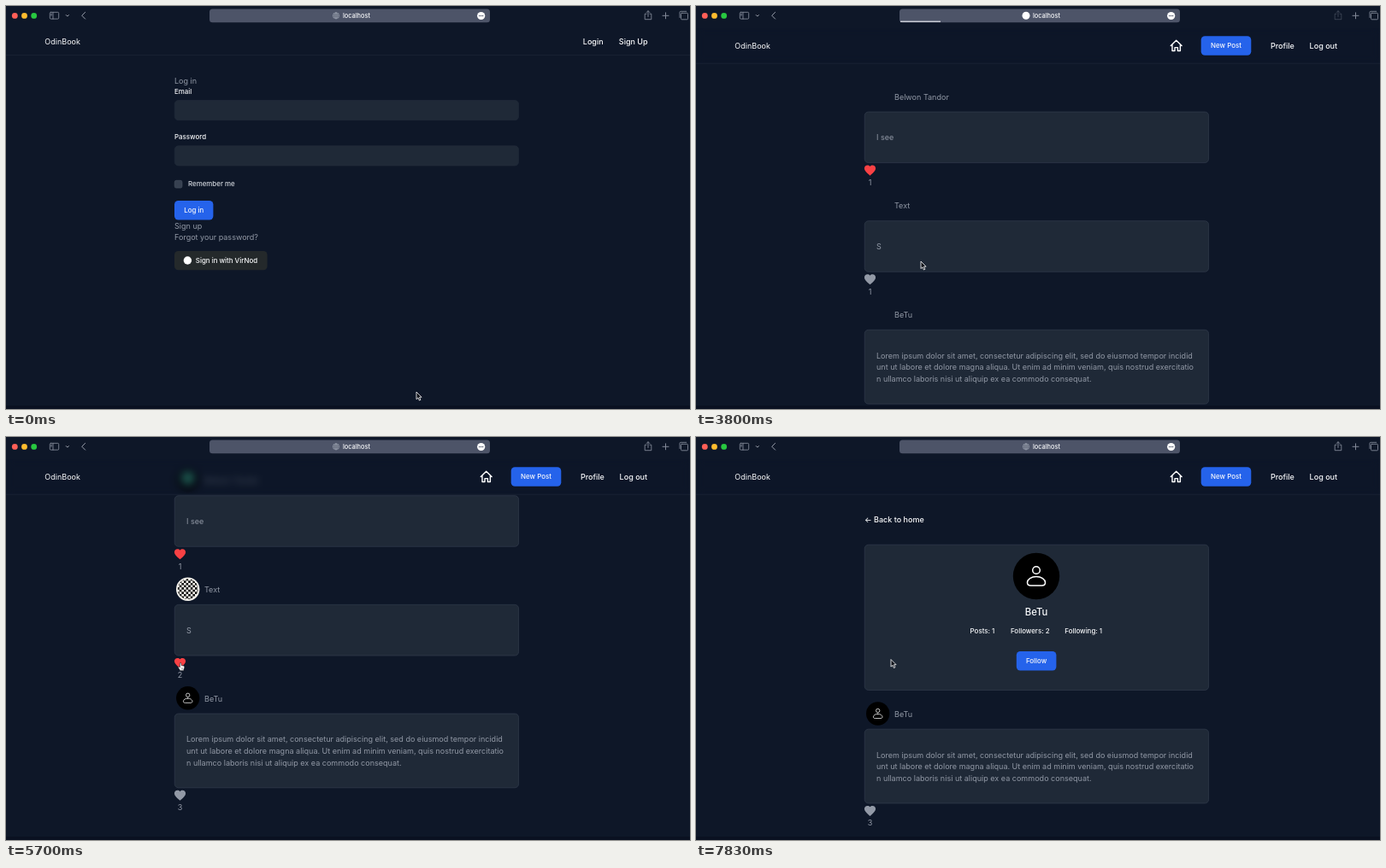
An HTML page for the animation above (8000 ms loop, 800x472 px).

```html
<!DOCTYPE html>
<html lang="en">
<head>
<meta charset="utf-8">
<title>OdinBook</title>
<style>
  html, body { margin: 0; width: 100%; height: 100%; overflow: hidden; background: #0e1728; }
  svg { position: absolute; left: 0; top: 0; width: 800px; height: 472px; }
  svg text { font-family: Inter, sans-serif; white-space: pre; }
  #glass {
    position: absolute; left: 0; top: 26px; width: 800px; height: 41px;
    background: rgba(14, 23, 40, .55);
    -webkit-backdrop-filter: blur(4px); backdrop-filter: blur(4px);
  }
</style>
</head>
<body>
<svg id="page" viewBox="0 0 800 472"></svg>
<div id="glass"></div>
<svg id="overlay" viewBox="0 0 800 472"></svg>
<script>
const LOOP = 8000;
const BG = '#0e1728', CARD = '#1f2937', LINE = '#374151', GRAY = '#9299a6', WHITE = '#f8f9fb',
      BLUE = '#2563eb', RED = '#f94144';
const BASE = 9.04, SMALL = 7.91;
const AUTHOR = 'Belwon Tandor', MEMBER = 'BeTu';
const LOREM = [
  'Lorem ipsum dolor sit amet, consectetur adipiscing elit, sed do eiusmod tempor incidid',
  'unt ut labore et dolore magna aliqua. Ut enim ad minim veniam, quis nostrud exercitatio',
  'n ullamco laboris nisi ut aliquip ex ea commodo consequat.'
];

// SVG builders; text is placed by the vertical centre of its capitals
const text = (x, y, str, { size = BASE, weight = 400, fill = GRAY, anchor = 'start', id = '' } = {}) =>
  `<text id="${id}" x="${x}" y="${y + size * .364}" font-size="${size}" font-weight="${weight}" fill="${fill}" text-anchor="${anchor}">${str}</text>`;
const rect = (x, y, w, h, fill, { r = 4.5, stroke = 'none', id = '' } = {}) =>
  `<rect id="${id}" x="${x}" y="${y}" width="${w}" height="${h}" rx="${r}" fill="${fill}" stroke="${stroke}" stroke-width=".6"/>`;
const circle = (x, y, r, fill, extra = '') => `<circle cx="${x}" cy="${y}" r="${r}" fill="${fill}" ${extra}/>`;
const line = (d, stroke, width = .9, extra = '') =>
  `<path d="${d}" fill="none" stroke="${stroke}" stroke-width="${width}" stroke-linecap="round" stroke-linejoin="round" ${extra}/>`;
const group = (id, content, extra = '') => `<g id="${id}" ${extra}>${content}</g>`;
const panel = (y, h) => rect(197.2, y, 402.4, h, CARD, { stroke: LINE });
const button = (x, y, w, label) =>
  rect(x, y, w, 22.5, BLUE) +
  text(x + w / 2, y + 11.3, label, { size: SMALL, weight: 500, fill: WHITE, anchor: 'middle' });

const heart = (y, fill, id = '') =>
  `<path id="${id}" transform="translate(195.6 ${y - 8}) scale(.66)" fill="${fill}" d="M12 21.3l-1.4-1.3C5.4 15.4 2 12.3 2 8.5 2 5.4 4.4 3 7.5 3c1.7 0 3.4.8 4.5 2.1C13.1 3.8 14.8 3 16.5 3 19.6 3 22 5.4 22 8.5c0 3.8-3.4 6.9-8.6 11.5z"/>`;

const avatars = {
  person: (x, y, scale) => `<g transform="translate(${x} ${y}) scale(${scale})">` + circle(0, 0, 27.2, '#000') +
    circle(0, -7, 4.3, 'none', 'stroke="#fff" stroke-width="1.5"') +
    line('M0 .5c6 0 10.5 3.5 10.5 7 0 2.300-1.500 3.500-4 3.500h-13c-2.500 0-4-1.200-4-3.500 0-3.500 4.500-7 10.500-7z', '#fff', 1.5) + '</g>',
  checks: (x, y) => circle(x, y, 13.7, '#f4f2ec') + circle(x, y, 11.9, 'url(#checks)'),
  glow: (x, y) => circle(x, y, 13.7, '#000') +
    `<ellipse cx="${x}" cy="${y - 2.500}" rx="8" ry="8" fill="#2b9470"/>`
};

function post(y, height, name, avatar, body, likes, liked, id) {
  const end = y + height;
  return group('', avatars[avatar](212.7, y - 18.2, .503), `class="avatar-${id}"`) +
    text(232, y - 17.7, name) + panel(y, height) +
    body.map((row, i) => text(211, y + 30.2 + i * 13.56, row)).join('') +
    heart(end + 9, liked ? RED : GRAY, 'heart-' + id) +
    text(203.5, end + 23, likes, { anchor: 'middle', id: 'likes-' + id });
}

const field = (y, label) =>
  text(197, y, label, { size: SMALL, weight: 500, fill: WHITE }) + rect(197.2, y + 10.500, 402.4, 23.2, CARD, { stroke: '#222d3b' });

const login =
  text(197, 88, 'Log in') + field(100, 'Email') + field(153.3, 'Password') +
  rect(197.2, 204.3, 8.8, 8.8, LINE, { r: 2, stroke: '#4b5563' }) +
  text(213, 208.4, 'Remember me', { size: SMALL, weight: 500, fill: '#d3d7de' }) +
  button(197, 228, 45.4, 'Log in') +
  text(197, 257.6, 'Sign up') + text(197, 271.2, 'Forgot your password?') +
  rect(197, 287, 108.600, 22.2, '#24292b', { id: 'oauth' }) +
  circle(212.4, 298, 4.7, '#fff') +
  text(221.8, 298, 'Sign in with VirNod', { size: SMALL, weight: 500, fill: WHITE });

const feed =
  post(124, 59.600, AUTHOR, 'glow', ['I see'], 1, true, 'a') +
  post(251.7, 59.600, 'Text', 'checks', ['S'], 1, false, 'b') +
  post(379.3, 86.800, MEMBER, 'person', LOREM, 3, false, 'c') +
  rect(5, 564, 786, 60, '#1a2434');

const stat = (x, label) => text(x, 227.3, label, { size: SMALL, weight: 500, fill: WHITE });
const profile =
  text(197, 97, '← Back to home', { weight: 500, fill: WHITE }) + panel(126.2, 170.3) +
  avatars.person(398, 163, 1) +
  text(398, 204.600, MEMBER, { size: 11.3, weight: 500, fill: WHITE, anchor: 'middle' }) +
  stat(320.6, 'Posts: 1') + stat(368, 'Followers: 2') + stat(431.3, 'Following: 1') +
  button(374.8, 251, 46.6, 'Follow') +
  post(342.2, 86.800, MEMBER, 'person', LOREM, 3, false, 'd');

const navText = (x, y, str) => text(x, y, str, { weight: 500, fill: WHITE });
const brand = y => text(45.3, y, 'OdinBook', { fill: WHITE });
const border = y => `<rect y="${y}" width="800" height=".7" fill="#1c2637"/>`;
const guestNav = brand(42) + navText(674.8, 42, 'Login') + navText(716.8, 42, 'Sign Up') + border(57.3);
const memberNav = brand(46.500) +
  line('M555.300 46.600l6.400-6.300 6.400 6.300M557 45.200v7.300h3v-3.900h3.400v3.900h3v-7.300', '#fff', 1.4) +
  button(590.7, 35.2, 58.6, 'New Post') +
  navText(671.9, 46.500, 'Profile') + navText(717.6, 46.500, 'Log out') + border(66.800);

const ICON = '#828998';
const chrome =
  `<rect width="800" height="26" fill="${BG}"/>` +
  circle(10.3, 11.4, 3.4, '#ff5f57') + circle(21.5, 11.4, 3.4, '#febc2e') + circle(32.7, 11.4, 3.4, '#28c840') +
  line('M52.500 7.300h8q1.200 0 1.200 1.200v5.400q0 1.200-1.200 1.200h-8q-1.200 0-1.200-1.200v-5.400q0-1.200 1.200-1.200zM55 7.300v7.800M52.500 9.300h1.200M52.500 11h1.200', ICON) +
  line('M70.300 10.600l1.500 1.500 1.500-1.500', '#a5abb7', 1) +
  line('M92.600 7.300l-3.900 3.900 3.900 3.900', '#9aa0ad', 1) +
  rect(238, 3.600, 328, 15.600, '#4d5468', { r: 3.500 }) +
  group('globe', circle(386, 11.3, 3.6, 'none', 'stroke="#a2a8b5" stroke-width=".6"') +
    line('M382.400 11.300h7.200M386 7.700v7.200M386 7.700q-3.400 3.600 0 7.200q3.400-3.600 0-7.200M383.200 9.300h5.600M383.200 13.300h5.600', '#a2a8b5', .5)) +
  group('favicon', circle(386, 11.3, 4.5, '#fff')) +
  text(394, 11.500, 'localhost', { size: 7.35, weight: 500, fill: WHITE }) +
  circle(555.7, 11.5, 4.6, '#fff') + [-2, 0, 2].map(dx => circle(555.7 + dx, 11.5, .75, '#4d5468')).join('') +
  `<rect id="progress" x="239" y="17.600" height="1.200" fill="#e6e8ee"/>` +
  group('share', line('M749 9.200h-1.800v6.500h7.600v-6.500H753M751 12.500V5.800M749.200 7.500l1.800-1.800 1.800 1.800', ICON)) +
  line('M768 11.300h7M771.500 7.800v7', ICON, 1) +
  line('M790.500 8.300h6q1 0 1 1v5.500q0 1-1 1h-6q-1 0-1-1v-5.500q0-1 1-1zM788 13.500v-6q0-1.200 1.200-1.200h6.500', ICON);

const cursor =
  group('arrow', '<path d="M0 0v8.600l2-1.800 1.400 3.200 1.500-.7-1.400-3.100h2.600z" fill="#10131a" stroke="#fff" stroke-width=".8" stroke-linejoin="round"/>') +
  group('hand', '<path d="M-.7.700q0-.8.800-.8t.8.800l.3 2.500q1-.5 1.300.2 1-.4 1.300.4 1-.2 1 .8 0 2-.9 3.200v1.400H-.4Q-.8 8-2.600 5.500-3 4.600-2 4.400l1.500.8z" fill="#fff" stroke="#15181f" stroke-width=".6"/>' +
    line('M1.200 6v1.700M2.600 6v1.700', '#333', .4));

document.getElementById('page').innerHTML =
  `<defs><pattern id="checks" width="5.200" height="5.200" patternUnits="userSpaceOnUse">
    <path d="M0 0h2.600v5.200h2.600V2.600H0z" fill="#111"/></pattern></defs>` +
  group('login', login) + group('feed', feed) + group('profile', profile);
document.getElementById('overlay').innerHTML =
  group('guestNav', guestNav) + group('memberNav', memberNav) + chrome +
  '<rect y="468" width="800" height="4" fill="#0a1121"/>' + group('cursor', cursor);

// Keys are [time, ...values]; every leg eases out with the given power
function track(keys, t, power = 2) {
  const next = keys.findIndex(key => key[0] > t);
  if (next === 0) return keys[0].slice(1);
  if (next < 0) return keys[keys.length - 1].slice(1);
  const from = keys[next - 1], to = keys[next];
  const p = 1 - (1 - (t - from[0]) / (to[0] - from[0])) ** power;
  return from.slice(1).map((v, i) => v + (to[i + 1] - v) * p);
}
const within = (t, ...spans) => spans.some(([a, b]) => t >= a && t < b);

const POINTER = [
  [15, 480, 452], [170, 373, 391], [315, 373, 391], [870, 263, 299], [4250, 263, 299], [4400, 271, 310.500],
  [5000, 271, 310.500], [5400, 211, 268], [5450, 211, 268], [5640, 204, 264.500],
  [6910, 204, 264.500], [7170, 228, 260.500]
];
const SCROLL = [[4620, 0], [5220, 55.3], [6060, 55.3], [6730, 110]];
const PROGRESS = [[1980, 0], [2500, 38], [2800, 39], [2860, 39], [3470, 47], [3805, 47], [4030, 327]];
const HOVER = [[690, 36, 41, 43], [840, 10, 16, 28]];

const $ = id => document.getElementById(id);
const show = (id, on) => { $(id).style.display = on ? '' : 'none'; };
const firstAvatars = document.querySelectorAll('.avatar-a, .avatar-b, .avatar-c');

function render(t) {
  const guest = t < 3790, onProfile = t >= 7730, loading = within(t, [2000, 4030]);
  show('login', guest);
  show('guestNav', guest);
  show('memberNav', !guest);
  show('glass', !guest);
  show('feed', !guest && !onProfile);
  show('profile', onProfile);

  $('oauth').setAttribute('fill', `rgb(${track(HOVER, t, 1)})`);
  $('feed').setAttribute('transform', `translate(0 ${-track(SCROLL, t, t < 6000 ? 6 : 5)[0]})`);
  firstAvatars.forEach(a => { a.style.display = t >= 3870 ? '' : 'none'; });
  const liked = t >= 5670;
  $('heart-b').setAttribute('fill', liked ? RED : GRAY);
  $('likes-b').textContent = liked ? 2 : 1;

  show('globe', !loading);
  show('favicon', loading);
  show('progress', loading);
  $('progress').setAttribute('width', track(PROGRESS, t)[0]);
  $('share').setAttribute('opacity', loading ? .4 : 1);

  const hand = within(t, [690, 2030], [4700, 5080], [5400, 7800]);
  show('arrow', !hand);
  show('hand', hand);
  $('cursor').setAttribute('transform', `translate(${track(POINTER, t).join(' ')})`);
}

function tick() {
  render(performance.now() % LOOP);
  requestAnimationFrame(tick);
}
tick();
</script>
</body>
</html>
```
